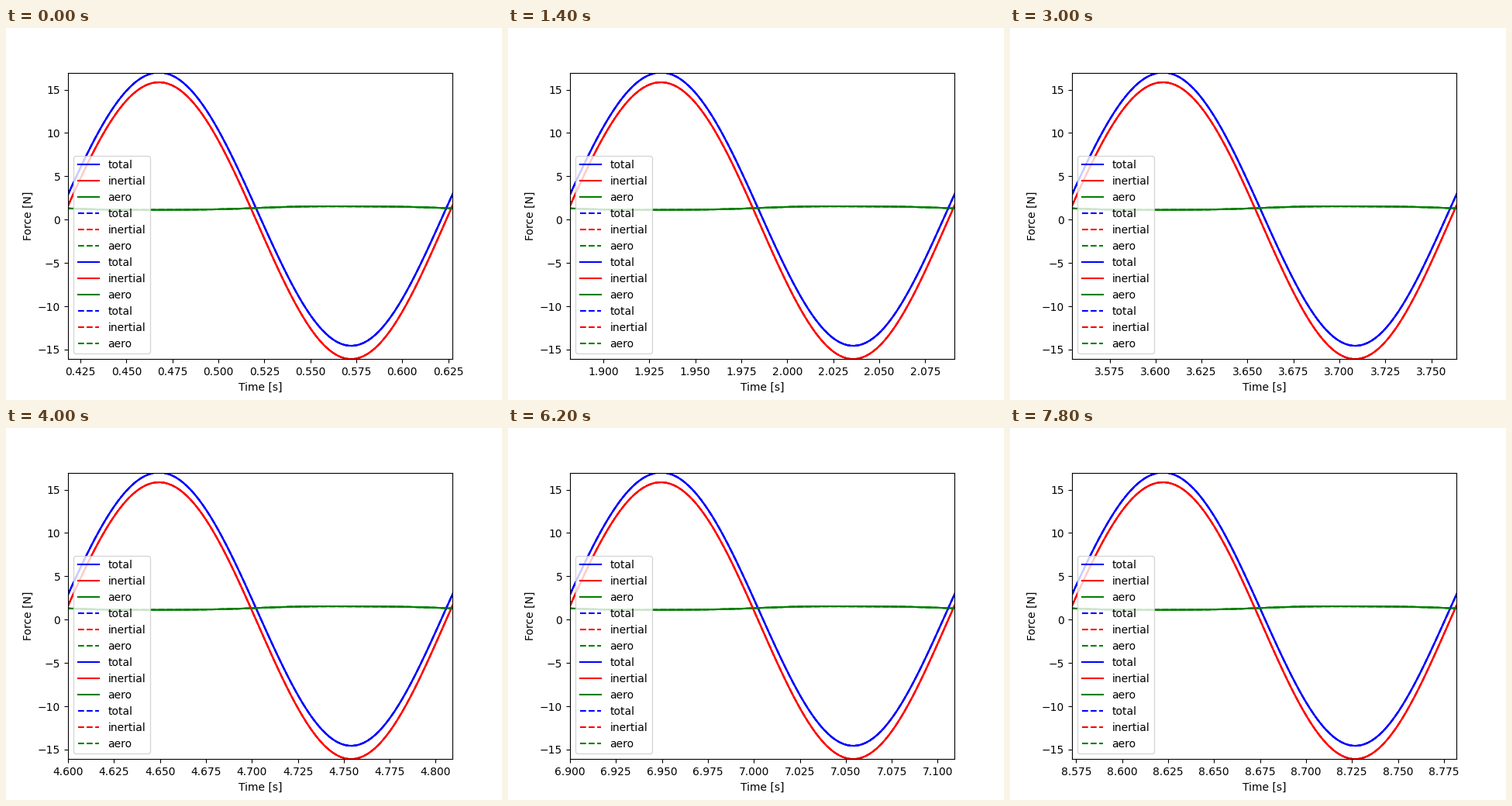
Write a matplotlib script that moves like this. It is 640 by 480 pixels and loops after 8 s.

```python
import numpy as np
import matplotlib.pyplot as plt
from matplotlib.animation import FuncAnimation

PERIOD = 2.3 / 11
FRAMES = 40
FIRST_CYCLE = 2

fig, ax = plt.subplots(figsize=(6.4, 4.8), dpi=100)

time = np.linspace(0, 44 * PERIOD, 44 * 100 + 1)
theta = 2 * np.pi * time / PERIOD
swing = theta - 2 * np.pi * 0.2365

inertial = 0.06 + 15.98 * np.cos(swing) - 0.18 * np.cos(2 * swing)
aero = (1.33 - 0.22 * np.sin(theta) - 0.03 * np.cos(theta)
        - 0.02 * np.sin(3 * theta))
total = inertial + aero

curves = [("total", total, "b"), ("inertial", inertial, "r"),
          ("aero", aero, "g")]
for style in ("-", "--") * 2:
    for label, force, color in curves:
        ax.plot(time, force, color + style, label=label)

ax.set_ylim(-16.1, 16.97)
ax.set_xlabel("Time [s]")
ax.set_ylabel("Force [N]")
ax.legend(loc="lower left")


def update(frame):
    """Show one whole cycle, moving on by a cycle per frame."""
    start = (FIRST_CYCLE + frame) * PERIOD
    ax.set_xlim(start, start + PERIOD)
    return ax.lines


anim = FuncAnimation(fig, update, frames=FRAMES, interval=200,
                     repeat=True, repeat_delay=0)
plt.show()
```
